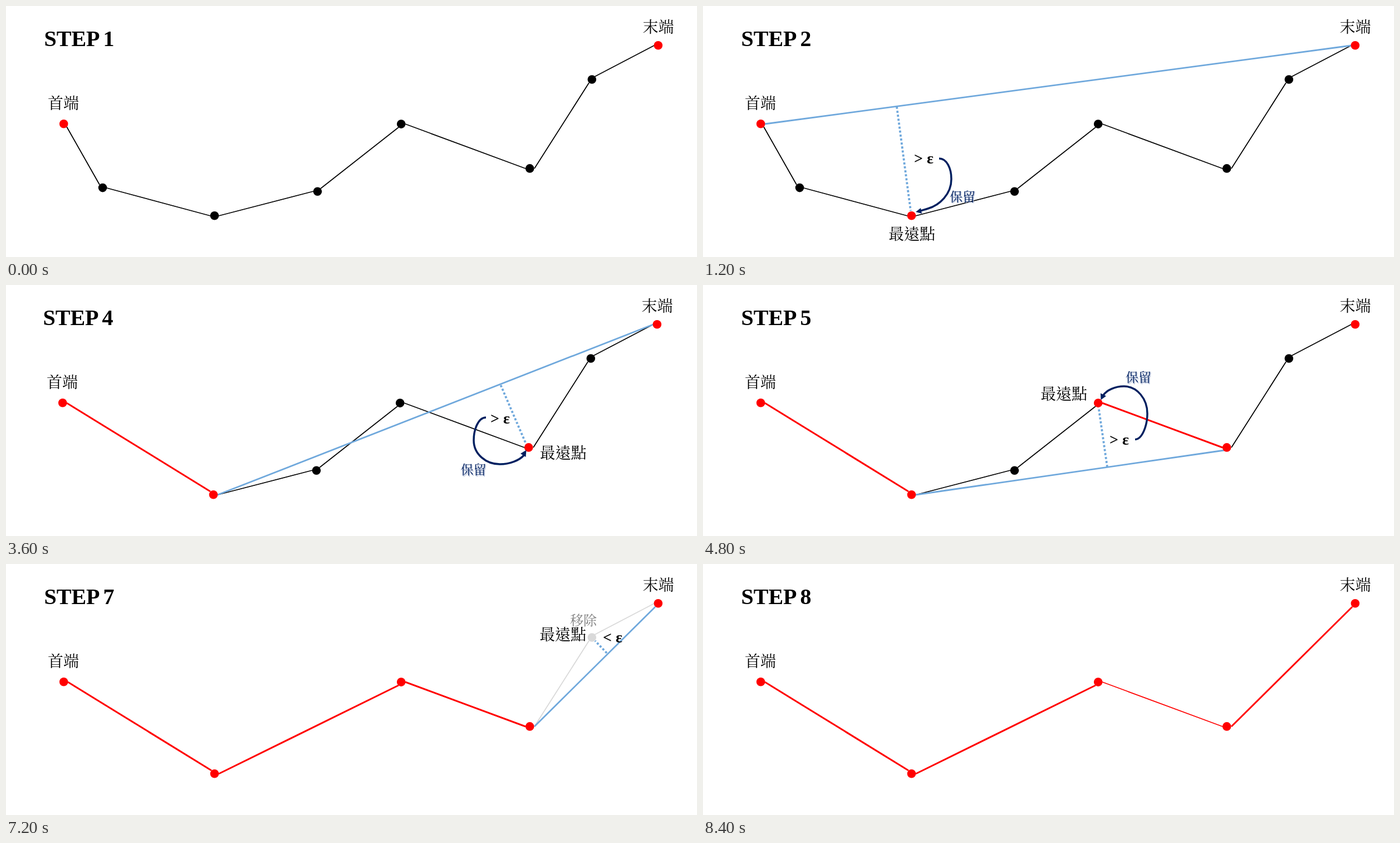
Write an HTML page that moves like this. It is 1241 px wide and 451 px high and loops after 9600 ms.

```html
<!DOCTYPE html>
<html lang="zh-Hant">
<head>
<meta charset="utf-8">
<title>Line simplification</title>
<style>
html, body { margin: 0; width: 100%; height: 100%; overflow: hidden; background: #fff; }
svg { display: block; width: 1241px; height: 451px; }
.latin { font-family: "Liberation Serif", "Times New Roman", serif; font-weight: 700; }
.han { font-family: "DFKai-SB", "BiauKai", "KaiTi", "Noto Serif CJK TC", "Noto Sans CJK TC", "Noto Sans CJK", serif; }
.keep { text-shadow: 1.5px 1.5px 1px #a9b6d3; }
</style>
</head>
<body>
<svg id="stage" viewBox="0 0 1241 451"></svg>
<script>
const STEP_MS = 1200;
const RED = '#ff0000', BLACK = '#000', BLUE = '#6fa8dc', PALE = '#d9d9d9', GRAY = '#7f7f7f', NAVY = '#002060';

const points = [[103.7, 211.7], [173.6, 326.6], [374.5, 376.7], [559.5, 333.2],
  [709.7, 212.1], [940.7, 291.9], [1052.3, 132], [1171.3, 70.8]];

// Connectors, keyed by the two points they join
const links = {
  '01': [109, 217, 168, 321], '12': [181, 327, 367, 377], '23': [382, 377, 552, 333],
  '34': [565, 328, 705, 218], '45': [717, 212, 933, 292], '56': [949, 292, 1047, 138],
  '67': [1057, 127, 1164, 71], '02': [111, 212, 369, 371], '07': [111, 212, 1164, 71],
  '27': [382, 377, 1164, 71], '25': [382, 377, 936, 297], '24': [382, 377, 705, 218],
  '57': [949, 292, 1166, 77]
};

// Each step: links by style, red and pale points, then the notes
const steps = [
  { black: '01 12 23 34 45 56 67', reds: '07' },
  { black: '01 12 23 34 45 56 67', blue: '07', reds: '027',
    dots: [348, 181, 373, 368], eps: ['>', 379, 283], far: [333, 409],
    mark: ['保留', 443, 342],
    arc: 'M424 274C438 274 446 292 446 311C446 338 425 358 404 364C398 366 394 367 391 368',
    head: '382,370 391,363 393,373' },
  { pale: '01 12', black: '23 34 45 56 67', blue: '02', reds: '027', pales: '1',
    dots: [204.5, 271, 174, 320], eps: ['<', 201, 313], far: [70, 331],
    mark: ['移除', 174, 381.5],
    arc: 'M218.5 325C218 345 207 357 196 357C187 357 181 351 177.5 344',
    head: '173.5,334.5 172.5,346 182.5,342.5' },
  { shift: -2, black: '23 34 45 56 67', red: '02', blue: '27', reds: '0257',
    dots: [890.5, 180, 937, 288], eps: ['>', 872, 249], far: [960.5, 301],
    mark: ['保留', 818.5, 331.5],
    arc: 'M864 238C850 238 842 260 842 279C842 304 864 322 889 322C907 322 924 315 932 306',
    head: '936.5,296.5 926,303 935.5,309' },
  { black: '23 34 56 67', red: '02 45', blue: '25', reds: '02457',
    dots: [726, 327, 710.5, 220], eps: ['>', 730, 287], far: [606, 195.5],
    mark: ['保留', 759, 165.5],
    arc: 'M776 277.5C790 277 798 250 798 231C798 205 780 182 756 182C740 182 725 189 719 198',
    head: '714.5,206.5 714,194.5 724,199.5' },
  { pale: '23 34', black: '56 67', red: '02 45', blue: '24', reds: '02457', pales: '3',
    dots: [540.5, 300, 555, 328], eps: ['<', 550.5, 316], far: [583, 348], mark: ['移除', 520, 362.5] },
  { pale: '56 67', black: '', red: '02 24 45', blue: '57', reds: '02457', pales: '6', gone: '3',
    dots: [1079, 160, 1058, 138], eps: ['<', 1072, 141], far: [958, 126], mark: ['移除', 1013, 101] },
  { red: '02 24 57', thin: '45', reds: '02457', gone: '36' }
];
// Points already dropped leave no trace afterwards
['', '', '', '1', '1', '1', '13', '136'].forEach((g, i) => steps[i].gone = g);

const svg = document.getElementById('stage');

function add(parent, tag, attrs, text) {
  const el = document.createElementNS('http://www.w3.org/2000/svg', tag);
  for (const k in attrs) el.setAttribute(k, attrs[k]);
  if (text) el.textContent = text;
  parent.appendChild(el);
  return el;
}

function line(g, [x1, y1, x2, y2], stroke, width, dash = 'none') {
  add(g, 'line', { x1, y1, x2, y2, stroke, 'stroke-width': width, 'stroke-dasharray': dash });
}

function latin(g, text, x, y, size) {
  add(g, 'text', { class: 'latin', x, y, 'font-size': size }, text);
}

// Han text is placed by its left edge and vertical centre
function han(g, text, x, mid, size = 28, fill = BLACK, weight = 400, cls = '') {
  add(g, 'text', { class: 'han ' + cls, x, y: mid + size * 0.38, 'font-size': size, fill, 'font-weight': weight }, text);
}

function build(step, i) {
  const g = add(svg, 'g', { transform: `translate(${step.shift || 0})`, visibility: 'hidden' });
  const styles = [['pale', PALE, 1.8], ['black', BLACK, 1.8], ['red', RED, 3], ['thin', RED, 1.8], ['blue', BLUE, 2.8]];
  for (const [key, color, width] of styles)
    for (const id of (step[key] || '').split(' ').filter(Boolean)) line(g, links[id], color, width);

  if (step.dots) line(g, step.dots, BLUE, 3.8, '3.8 3.4');

  points.forEach(([cx, cy], n) => {
    if (step.gone.includes(n)) return;
    const fill = step.reds.includes(n) ? RED : (step.pales || '').includes(n) ? PALE : BLACK;
    add(g, 'circle', { cx, cy, r: 7.8, fill });
  });

  latin(g, 'STEP', 68.5, 72, 40);
  latin(g, String(i + 1), 174.5, 72, 40);
  han(g, '首端', 75, 174);
  han(g, '末端', 1143.5, 37);

  if (step.eps) {
    const [sign, x, y] = step.eps;
    latin(g, sign + ' ε', x, y, 28);
  }
  if (step.far) han(g, '最遠點', ...step.far, 28, BLACK, 500);
  if (step.mark) {
    const keep = step.mark[0] === '保留';
    const color = keep ? NAVY : GRAY;
    if (step.arc) {
      add(g, 'path', { d: step.arc, fill: 'none', stroke: color, 'stroke-width': 3.5 });
      add(g, 'polygon', { points: step.head, fill: color });
    }
    han(g, ...step.mark, keep ? 23 : 24, color, 500, keep ? 'keep' : '');
  }
  return g;
}

const groups = steps.map(build);
const start = performance.now();

function draw(now) {
  const current = Math.floor(Math.max(0, now - start) / STEP_MS) % groups.length;
  groups.forEach((g, i) => g.setAttribute('visibility', i === current ? 'visible' : 'hidden'));
  requestAnimationFrame(draw);
}
draw(start);
</script>
</body>
</html>
```
